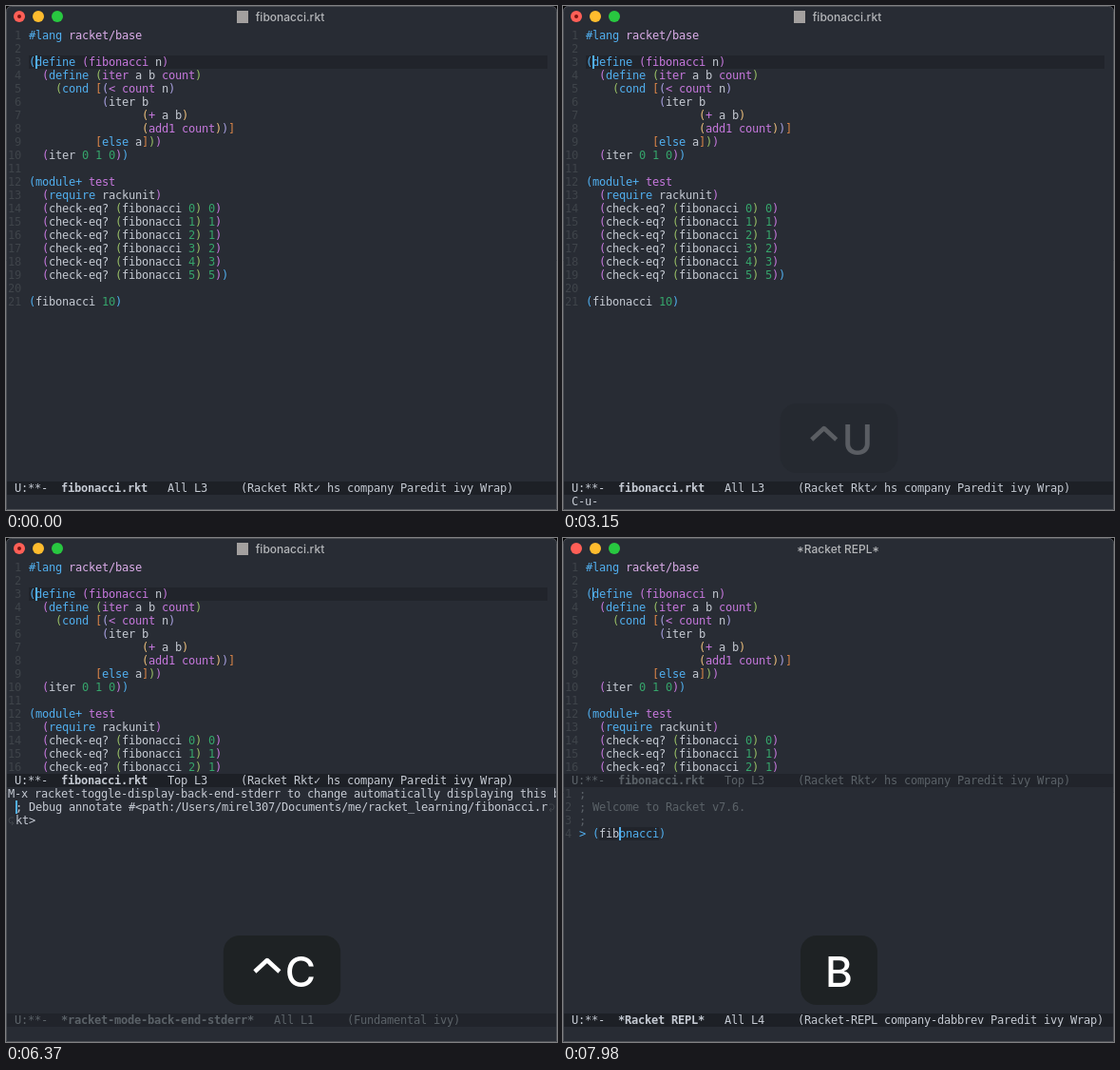
Recreate the animation shown at these times as an HTML page with a canvas. Size 580 px wide and 530 px high, loop 8000 ms.

```html
<!DOCTYPE html>
<html lang="en">
<head>
<meta charset="utf-8">
<title>Racket step debugging</title>
<style>
html, body { margin: 0; width: 100%; height: 100%; overflow: hidden; background: #000; }
canvas { display: block; }
</style>
</head>
<body>
<canvas id="stage" width="580" height="530"></canvas>
<script>
const ctx = document.getElementById('stage').getContext('2d');
const LOOP = 8000, CELL = 7, ROW = 14;
const BG = '#282c34', DARK = '#1d2026', HL = '#21242b', FG = '#c5cad3', DIM = '#5b6268', GUTTER = '#3f444a';
const BLUE = '#51afef', MAGENTA = '#c678dd', GREEN = '#36a56b';
const RAINBOW = [BLUE, MAGENTA, '#98be65', '#da8548', '#a9a1e1', '#ecbe7b'];

// Moments at which the editor state changes
const PREFIX = 2750, SPLIT = 3290, CLEAR = 5950, REPL = 6510, PAREN = 7000, COMPLETE = 7910;
const TYPED = [7490, 7630, 7840];

// Key overlays: press time, start of fade, keys
const KEYS = [
  [1750, 2940, '⌃U'], [SPLIT, 5180, '⌥⌃X'], [CLEAR, LOOP, '⌃C'], [6440, LOOP, '⌃Z'], [PAREN, LOOP, '⇧9'],
  [TYPED[0], LOOP, 'F'], [TYPED[1], LOOP, 'I'], [TYPED[2], LOOP, 'B']
];
const FADE = 280;
const SYMBOLS = {
  '⌃': { width: 39, path: new Path2D('M7 -16L20 -28L33 -16') },
  '⌥': { width: 42, path: new Path2D('M3 -28H14L28 -3H40M25 -28H40') },
  '⇧': { width: 43, path: new Path2D('M21.5 -29L6 -14H14V-2H29V-14H37Z') }
};

const SOURCE = `#lang racket/base

(define (fibonacci n)
  (define (iter a b count)
    (cond [(< count n)
           (iter b
                 (+ a b)
                 (add1 count))]
          [else a]))
  (iter 0 1 0))

(module+ test
  (require rackunit)
  (check-eq? (fibonacci 0) 0)
  (check-eq? (fibonacci 1) 1)
  (check-eq? (fibonacci 2) 1)
  (check-eq? (fibonacci 3) 2)
  (check-eq? (fibonacci 4) 3)
  (check-eq? (fibonacci 5) 5))

(fibonacci 10)`.split('\n');
const KEYWORDS = ['#lang', 'define', 'cond', 'else', 'module+', 'require'];
const BUILTINS = ['<', '+', 'add1', 'count', 'test'];

function tokenize(lines) {
  let depth = 0;
  const color = (word, before) => {
    if ('(['.includes(word)) return RAINBOW[depth++];
    if (')]'.includes(word)) return RAINBOW[--depth];
    if (KEYWORDS.includes(word)) return BLUE;
    if (BUILTINS.includes(word) || before.endsWith('(define (')) return MAGENTA;
    if (word === 'racket/base') return '#dcaeea';
    return /^\d+$/.test(word) ? GREEN : FG;
  };
  return lines.map(line => [...line.matchAll(/[()[\]]|[^\s()[\]]+/g)]
    .map(m => ({ text: m[0], col: m.index, color: color(m[0], line.slice(0, m.index)) })));
}
const CODE = tokenize(SOURCE);

function rect(x, y, w, h, color) {
  ctx.fillStyle = color;
  ctx.fillRect(x, y, w, h);
}

// Monospaced text on the character grid
function mono(text, x, baseline, color = FG, bold = false) {
  ctx.font = `${bold ? 'bold ' : ''}12px "DejaVu Sans Mono", monospace`;
  ctx.textAlign = 'left';
  ctx.fillStyle = color;
  [...text].forEach((c, i) => c !== ' ' && ctx.fillText(c, x + i * CELL, baseline));
}

function modeLine(y, name, position, modes, active) {
  const color = active ? FG : DIM;
  rect(1, y, 578, ROW, active ? DARK : HL);
  mono(' U:**-', 2, y + 11, color);
  mono(name, 58, y + 11, color, true);
  mono(`   ${position}     (${modes})`, 58 + name.length * CELL, y + 11, color);
}

const cursor = (x, y) => rect(x, y, 2, ROW, BLUE);

function titleBar(repl) {
  ['#ff5f57', '#febc2e', '#28c840'].forEach((color, i) => {
    dot(14 + i * 20, 6, color);
  });
  if (!repl) {
    dot(14, 2, '#7a1510');
    rect(243, 5, 12, 13, '#a3a09f');
  }
  ctx.font = '500 12px Inter, sans-serif';
  ctx.fillStyle = '#b4b6b9';
  ctx.textAlign = 'center';
  ctx.fillText(repl ? '*Racket REPL*' : 'fibonacci.rkt', repl ? 289.5 : 299, 16);
}

function dot(x, r, color) {
  ctx.fillStyle = color;
  ctx.beginPath();
  ctx.arc(x, 11, r, 0, 7);
  ctx.fill();
}

function editor(t) {
  const split = t >= SPLIT, repl = t >= REPL;
  if (!repl) rect(24, 52, 546, ROW, HL);
  CODE.slice(0, split ? 16 : 21).forEach((tokens, i) => {
    const y = 35 + i * ROW;
    mono(String(i + 1).padStart(2), 2, y, GUTTER);
    tokens.forEach(k => mono(k.text, 24 + k.col * CELL, y, k.color));
  });
  if (repl) rect(31, 52, 1, ROW, BLUE);
  else cursor(31, 52);
  modeLine(split ? 248 : 500, 'fibonacci.rkt', `${split ? 'Top' : 'All'} L3`,
    'Racket Rkt✓ hs company Paredit ivy Wrap', !repl);
}

function wrapMark(x, y, flip) {
  ctx.save();
  ctx.translate(x, y);
  ctx.scale(flip, 1);
  ctx.strokeStyle = GUTTER;
  ctx.lineWidth = 1;
  ctx.stroke(new Path2D('M-2 -3H1Q3 -3 3 0T0 3H-2M0 1L-2 3L0 5'));
  ctx.restore();
}

function stderrPane() {
  mono('M-x racket-toggle-display-back-end-stderr to change automatically displaying this b', 2, 273);
  mono('; Debug annotate #<path:/Users/mirel307/Documents/me/racket_learning/fibonacci.r', 10, 287);
  mono('kt>', 10, 301);
  wrapMark(574, 283, 1);
  wrapMark(6, 297, -1);
  cursor(10, 276);
  modeLine(500, '*racket-mode-back-end-stderr*', 'All L1', 'Fundamental ivy', false);
}

function replPane(t) {
  const typed = TYPED.filter(at => t >= at).length, complete = t >= COMPLETE;
  const word = 'fibonacci'.slice(0, typed), rest = complete ? 'onacci' : '';
  [';', '; Welcome to Racket v7.6.', ';', ''].forEach((text, i) => {
    mono(String(i + 1), 2, 273 + i * ROW, GUTTER);
    mono(text, 17, 273 + i * ROW, DIM);
  });
  mono('>', 17, 315, BLUE);
  const x = t >= PAREN ? 38 + typed * CELL : 31;
  if (t >= PAREN) {
    if (complete) rect(38, 304, 63, ROW, HL);
    mono('(', 31, 315, BLUE);
    mono(word, 38, 315);
    mono(rest + ')', x, 315, BLUE);
  }
  cursor(x, 304);
  modeLine(500, '*Racket REPL*', 'All L4',
    `Racket-REPL company${complete ? '-dabbrev' : ''} Paredit ivy Wrap`, true);
}

function echoArea(t) {
  let text = '';
  if (t >= PREFIX && t < SPLIT) text = 'C-u-';
  else if (t >= SPLIT && t < CLEAR) text = 'Now you can call the function in the REPL to step debug it.';
  else if (t >= PAREN && t < TYPED[0]) text = 'Indenting region...done';
  mono(text, t >= PAREN ? 10 : 9, 525);
}

function keyOverlay(t) {
  const key = KEYS.findLast(k => t >= k[0]);
  if (!key) return;
  const alpha = Math.min(1, 1 - (t - key[1]) / FADE);
  if (alpha <= 0) return;
  ctx.save();
  ctx.globalAlpha = alpha;
  ctx.font = '500 44px Inter, sans-serif';
  ctx.textAlign = 'left';
  const keys = [...key[2]];
  const widths = keys.map(k => SYMBOLS[k] ? SYMBOLS[k].width : ctx.measureText(k).width);
  const total = widths.reduce((a, b) => a + b) + 52;
  ctx.fillStyle = '#1e2224';
  ctx.beginPath();
  ctx.roundRect(290.5 - total / 2, 418, total, 73, 17);
  ctx.fill();
  ctx.translate(290.5 - total / 2 + 26, 472);
  ctx.fillStyle = ctx.strokeStyle = '#fff';
  ctx.lineWidth = 4.5;
  ctx.lineJoin = 'round';
  keys.forEach((k, i) => {
    if (SYMBOLS[k]) ctx.stroke(SYMBOLS[k].path);
    else ctx.fillText(k, 0, 0);
    ctx.translate(widths[i], 0);
  });
  ctx.restore();
}

function draw(t) {
  rect(0, 0, 580, 530, '#000');
  ctx.save();
  ctx.beginPath();
  ctx.roundRect(0, 0, 580, 530, [5, 5, 0, 0]);
  ctx.clip();
  rect(0, 0, 580, 530, BG);
  titleBar(t >= REPL);
  editor(t);
  if (t >= REPL) replPane(t);
  else if (t >= SPLIT) stderrPane();
  echoArea(t);
  keyOverlay(t);
  ctx.restore();
  ctx.strokeStyle = '#4b4e54';
  ctx.lineWidth = 1;
  ctx.beginPath();
  ctx.roundRect(0.5, 0.5, 579, 529, [5, 5, 0, 0]);
  ctx.stroke();
}

const start = performance.now();
function frame() {
  draw((performance.now() - start) % LOOP);
  requestAnimationFrame(frame);
}
frame();
</script>
</body>
</html>
```
